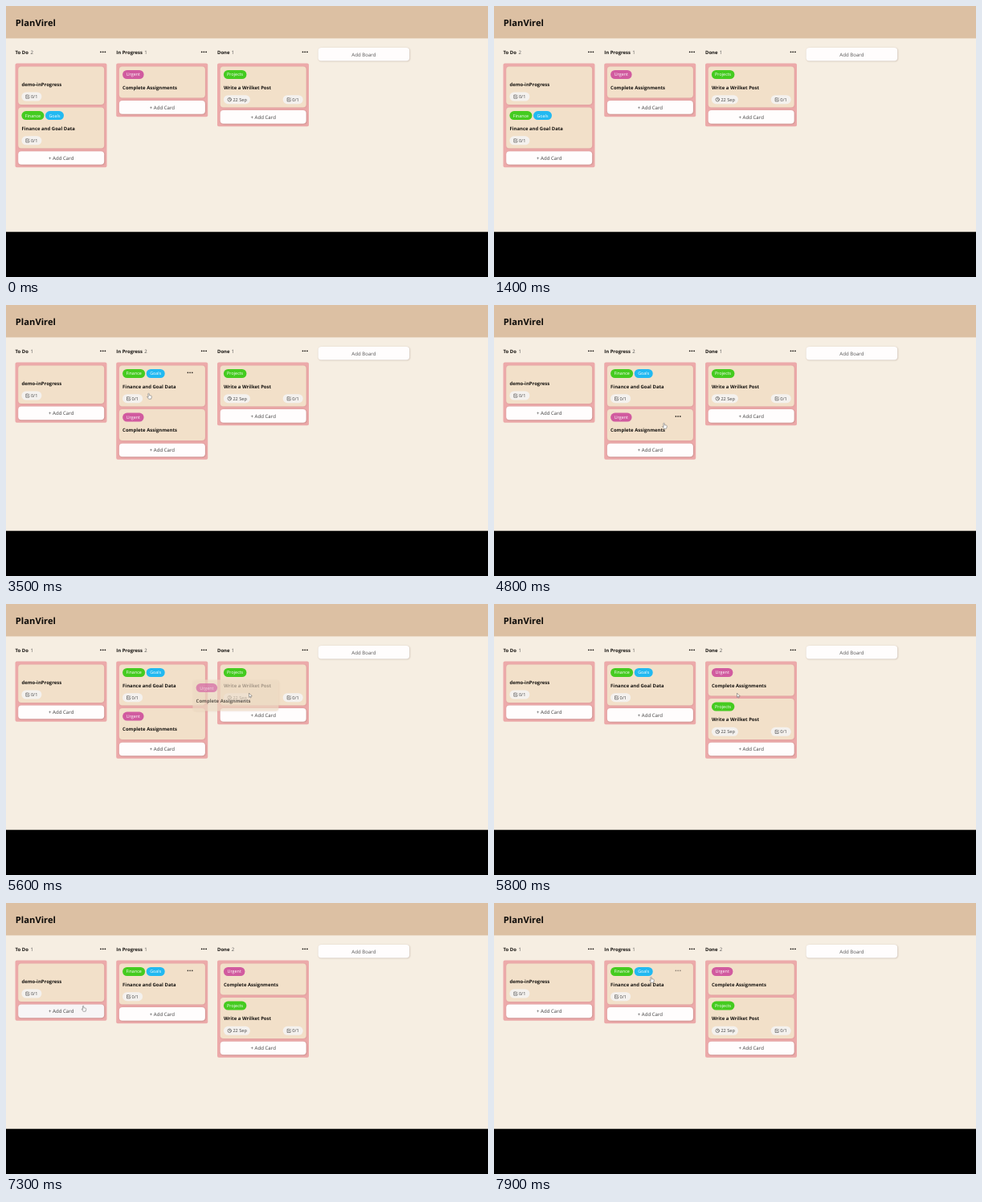
These frames come from a looping animation (600x338 px, 8 s). An HTML page with a canvas:

```html
<!DOCTYPE html>
<html lang="en">
<head>
<meta charset="utf-8">
<title>Task board</title>
<style>
html, body { margin: 0; width: 100%; height: 100%; overflow: hidden; background: #000; }
canvas { display: block; width: 600px; height: 338px; }
</style>
</head>
<body>
<canvas id="stage"></canvas>
<script>
const LOOP = 8000, W = 600, H = 338;
const FONT = '"Open Sans", "Noto Sans", sans-serif';
const stage = document.getElementById('stage');
const ctx = stage.getContext('2d');
const dpr = window.devicePixelRatio || 1;
stage.width = W * dpr;
stage.height = H * dpr;

const GREEN = '#45cb20', BLUE = '#22b9f1', PINK = '#d15b9f';
const CARD_W = 107, GAP = 3.6, TOP = 75.5, ADD_H = 16.6;
const DROP_1 = 3250, DROP_2 = 5650;
const COLS = [
  { x: 11.5, name: 'To Do', countX: 30.6 },
  { x: 137.2, name: 'In Progress', countX: 172.2 },
  { x: 263, name: 'Done', countX: 280.8 }
];
const CARDS = {
  demo: { h: 47.5, title: 'demo-inProgress', titleY: 24.6, badgeY: 32, tags: [], check: true },
  goal: { h: 51, title: 'Finance and Goal Data', check: true,
          tags: [['Finance', GREEN, 28], ['Goals', BLUE, 23]] },
  work: { h: 39, title: 'Complete Assignments', tags: [['Urgent', PINK, 26.5]] },
  post: { h: 51, title: 'Write a Wrilket Post', date: '22 Sep', check: true,
          tags: [['Projects', GREEN, 28.5]] }
};

// Drags: card, pick-up time, drop time
const DRAGS = [['goal', 1850, DROP_1], ['work', 4900, DROP_2]];
// Card menus: card, show time, hide time
const MENUS = [['goal', 1700, 1850], ['goal', DROP_1, 3750], ['work', 4350, 4900],
               ['goal', 6750, 7290], ['goal', 7800, 9000]];
// Pointer path: time, x, y
const PATH = [
  [1450, 298, 253], [1750, 62, 150], [1850, 62, 150], [2100, 105, 163], [2750, 175, 114],
  [3200, 177, 110], [3650, 177, 110], [4050, 212, 178], [4200, 212, 178], [4500, 211, 147],
  [4900, 211, 147], [5450, 302, 113], [5600, 302.5, 111.5], [6400, 302.5, 111.5],
  [6850, 208, 108], [7000, 190, 108], [7240, 95.5, 128], [7550, 95.5, 128],
  [7900, 195, 92], [8000, 195, 92]
];

const clamp = v => Math.max(0, Math.min(1, v));
const ease = v => v * v * (3 - 2 * v);

function pointer(t) {
  if (t < PATH[0][0]) return null;
  let i = 0;
  while (i < PATH.length - 2 && t >= PATH[i + 1][0]) i++;
  const [t0, x0, y0] = PATH[i], [t1, x1, y1] = PATH[i + 1];
  const k = ease(clamp((t - t0) / (t1 - t0)));
  return { x: x0 + (x1 - x0) * k, y: y0 + (y1 - y0) * k };
}

function layout(t) {
  const lists = t < DROP_1 ? [['demo', 'goal'], ['work'], ['post']]
    : t < DROP_2 ? [['demo'], ['goal', 'work'], ['post']]
    : [['demo'], ['goal'], ['work', 'post']];
  return lists.map((ids, i) => {
    const x = COLS[i].x + 3.7;
    let y = TOP;
    const cards = ids.map(id => {
      const card = { id, x, y };
      y += CARDS[id].h + GAP;
      return card;
    });
    return { ...COLS[i], cards, addX: x, addY: y, bottom: y + ADD_H + 3.5 };
  });
}

// Fonts are set large and scaled down so that glyph advances stay exact.
function text(str, x, y, size, color, weight = 400, align = 'left') {
  ctx.save();
  ctx.translate(x, y);
  ctx.scale(0.1, 0.1);
  ctx.font = `${weight} ${size * 10}px ${FONT}`;
  ctx.textAlign = align;
  ctx.fillStyle = color;
  ctx.fillText(str, 0, 0);
  ctx.restore();
}

function box(x, y, w, h, r, color, shadow) {
  ctx.save();
  if (shadow) {
    ctx.shadowColor = shadow;
    ctx.shadowBlur = 2 * dpr;
    ctx.shadowOffsetX = ctx.shadowOffsetY = 0.5 * dpr;
  }
  ctx.fillStyle = color;
  ctx.beginPath();
  ctx.roundRect(x, y, w, h, r);
  ctx.fill();
  ctx.restore();
}

function dots(x, y, r, color) {
  ctx.fillStyle = color;
  ctx.beginPath();
  for (let i = -1; i <= 1; i++) {
    ctx.moveTo(x + i * 2.7 + r, y);
    ctx.arc(x + i * 2.7, y, r, 0, 7);
  }
  ctx.fill();
}

function stroke(color, width, draw) {
  ctx.strokeStyle = color;
  ctx.lineWidth = width;
  ctx.lineJoin = ctx.lineCap = 'round';
  ctx.beginPath();
  draw();
  ctx.stroke();
}

function badge(x, y, w, label, clock) {
  box(x, y, w, 11, 5.5, '#f4f1ee');
  const cx = x + 7.4, cy = y + 5.5;
  stroke('#444', 0.6, () => {
    if (clock) {
      ctx.arc(cx, cy, 2.3, 0, 7);
      ctx.moveTo(cx, cy - 1.4);
      ctx.lineTo(cx, cy);
      ctx.lineTo(cx + 1, cy + 0.6);
    } else {
      ctx.moveTo(cx + 0.8, cy - 2);
      ctx.lineTo(cx - 2, cy - 2);
      ctx.lineTo(cx - 2, cy + 2.2);
      ctx.lineTo(cx + 2, cy + 2.2);
      ctx.lineTo(cx + 2, cy + 0.3);
      ctx.moveTo(cx - 0.9, cy - 0.3);
      ctx.lineTo(cx, cy + 0.7);
      ctx.lineTo(cx + 2.2, cy - 1.8);
    }
  });
  text(label, x + 11.5, y + 7.5, 5.6, '#444');
}

function card(id, x, y, menu = 0) {
  const c = CARDS[id];
  box(x, y, CARD_W, c.h, 4, '#f2e0c9', 'rgba(120,70,40,.14)');
  let tagX = x + 4.2;
  for (const [label, color, w] of c.tags) {
    box(tagX, y + 4.5, w, 11, 5.5, color);
    text(label, tagX + w / 2, y + 11.9, 5.4, '#fff', 400, 'center');
    tagX += w + 1.6;
  }
  text(c.title, x + 4.2, y + (c.titleY || 28), 5.95, '#161310', 700);
  const by = y + (c.badgeY || 35.7);
  if (c.date) badge(x + 4.2, by, 33, c.date, true);
  if (c.check) badge(c.date ? x + 78 : x + 4.2, by, 25, '0/1');
  if (menu > 0) {
    ctx.save();
    ctx.globalAlpha *= menu;
    dots(x + 88.2, y + 8.8, 0.85, '#2a2622');
    ctx.restore();
  }
}

function button(x, y, w, label, color, over) {
  box(x, y, w, ADD_H, 4, over ? '#f7f5f6' : '#fffdfd', 'rgba(60,30,20,.26)');
  text(label, x + w / 2, y + 10.7, 6.1, color, 400, 'center');
}

function cursor({ x, y }, outline) {
  ctx.save();
  ctx.translate(x, y);
  stroke('#666', 0.55, () => {
    outline();
    ctx.closePath();
    ctx.fillStyle = '#fff';
    ctx.fill();
  });
  ctx.restore();
}

function arrow() {
  const pts = [[0, 4.9], [1.1, 3.9], [1.9, 5.6], [2.6, 5.2], [1.9, 3.6], [3.4, 3.5]];
  ctx.moveTo(0, 0);
  pts.forEach(p => ctx.lineTo(...p));
}

function hand() {
  ctx.moveTo(0, 0.5);
  ctx.quadraticCurveTo(0.6, -0.5, 1.2, 0.5);
  ctx.lineTo(1.2, 2.7);
  ctx.lineTo(3.7, 3.2);
  ctx.quadraticCurveTo(4.4, 3.4, 4.3, 4.4);
  ctx.lineTo(3.6, 7.2);
  ctx.lineTo(0.6, 7.2);
  ctx.lineTo(-1.4, 4.4);
  ctx.quadraticCurveTo(-1.2, 3.5, 0, 4.6);
}

function menuAlpha(id, t) {
  const shown = MENUS.filter(m => m[0] === id)
    .map(([, on, off]) => Math.min(clamp((t - on) / 200), 1 - clamp((t - off) / 150)));
  return Math.max(0, ...shown);
}

function inside(p, x, y, h) {
  return !!p && p.x >= x && p.x <= x + CARD_W && p.y >= y && p.y <= y + h;
}

function draw(t) {
  ctx.setTransform(dpr, 0, 0, dpr, 0, 0);
  ctx.textRendering = 'geometricPrecision';
  ctx.fillStyle = '#000';
  ctx.fillRect(0, 0, W, H);
  ctx.fillStyle = '#f6eee2';
  ctx.fillRect(0, 0, W, 281.7);
  ctx.fillStyle = '#dcc0a3';
  ctx.fillRect(0, 0, W, 40.4);
  text('PlanVirel', 11.8, 25, 11.2, '#0c0a08', 700);

  const p = pointer(t);
  const drag = DRAGS.find(d => t >= d[1] && t < d[2]);
  let over = false;
  let held = null;

  for (const col of layout(t)) {
    text(col.name, col.x, 60.4, 5.95, '#161310', 700);
    text(String(col.cards.length), col.countX, 60.4, 6.1, '#555');
    dots(col.x + 109.2, 57.3, 0.92, '#161310');
    box(col.x, 71.6, 114, col.bottom - 71.6, 2, '#ecaaaa');
    for (const c of col.cards) {
      const menu = menuAlpha(c.id, t);
      card(c.id, c.x, c.y, menu);
      if (menu > 0 && inside(p, c.x, c.y, CARDS[c.id].h)) over = true;
      if (drag && drag[0] === c.id) held = c;
    }
    const hot = !drag && inside(p, col.addX, col.addY, ADD_H);
    button(col.addX, col.addY, CARD_W, '+ Add Card', '#3c3c3c', hot);
    over = over || hot;
  }
  button(388.6, 52, 113.6, 'Add Board', '#505050');

  if (held) {
    const from = pointer(drag[1]);
    const dx = p.x - from.x, dy = p.y - from.y;
    if (dx || dy) {
      ctx.save();
      ctx.globalAlpha = 0.65;
      card(held.id, held.x + dx, held.y + dy);
      ctx.restore();
    }
  }
  if (p) cursor(p, over && !drag ? hand : arrow);
}

const start = performance.now();
function tick() {
  draw((performance.now() - start) % LOOP);
  requestAnimationFrame(tick);
}
tick();
</script>
</body>
</html>
```
